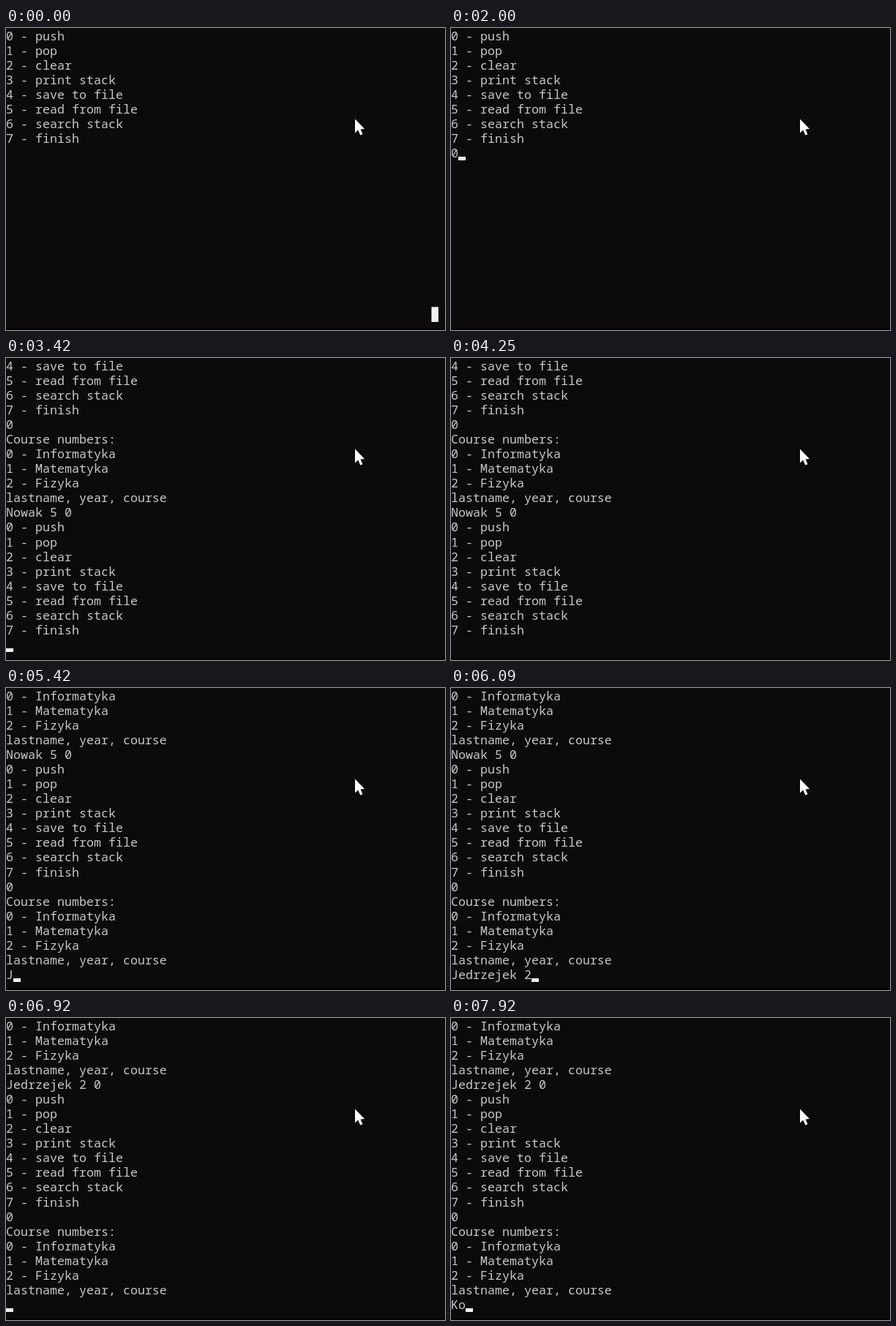
Recreate the animation shown at these times as an HTML page with a canvas. Size 600x413 px, loop 8000 ms.

```html
<!DOCTYPE html>
<html lang="en">
<head>
<meta charset="utf-8">
<title>Stack console</title>
<style>
  html, body { margin: 0; width: 100%; height: 100%; overflow: hidden; background: #0c0a0b; }
  canvas { display: block; width: 600px; height: 413px; }
</style>
</head>
<body>
<canvas id="stage"></canvas>
<script>
const W = 600, H = 413, LOOP = 8000;
const COL = 10, ROW = 20.08, ROWS = 20;

const canvas = document.getElementById('stage');
const ctx = canvas.getContext('2d');
const ratio = window.devicePixelRatio || 1;
canvas.width = W * ratio;
canvas.height = H * ratio;

const MENU = ['push', 'pop', 'clear', 'print stack', 'save to file',
  'read from file', 'search stack', 'finish'].map((s, i) => `${i} - ${s}\n`).join('');
const PROMPT = '\nCourse numbers:\n0 - Informatyka\n1 - Matematyka\n2 - Fizyka\nlastname, year, course\n';

// Console output: start time, text, and typing duration (0 = all at once)
const OUTPUT = [
  [0, MENU, 0],
  [670, '0', 0],
  [2170, PROMPT, 0],
  [2840, 'Nowak 5 0', 410],
  [3330, '\n' + MENU, 0],
  [4670, '0', 0],
  [4840, PROMPT, 0],
  [5420, 'Jedrzejek 2 0', 750],
  [6250, '\n' + MENU, 0],
  [6670, '0', 0],
  [6840, PROMPT, 0],
  [7840, 'Ko', 80]
];

// Intervals in which the caret is blinked off
const CARET_OFF = [[0, 500], [1090, 1590], [4250, 4670], [7420, 7840]];
const BLOCK_END = 670;

function consoleText(t) {
  let text = '';
  for (const [start, s, span] of OUTPUT) {
    if (t < start) break;
    const count = span ? 1 + Math.floor((t - start) / span * (s.length - 1) + 0.01) : s.length;
    text += s.slice(0, count);
  }
  return text;
}

function drawPointer() {
  ctx.beginPath();
  [[477, 124.5], [477, 143.5], [481.2, 139.6], [484.3, 146.6],
   [487.5, 145.2], [484.5, 138.4], [490, 138]].forEach(([x, y]) => ctx.lineTo(x, y));
  ctx.closePath();
  ctx.fill();
}

function draw(t) {
  ctx.setTransform(ratio, 0, 0, ratio, 0, 0);
  ctx.fillStyle = '#0c0a0b';
  ctx.fillRect(0, 0, W, H);
  ctx.fillStyle = '#000';
  ctx.fillRect(0, H - 2, W, 2);

  const lines = consoleText(t).split('\n').slice(-ROWS);
  ctx.font = '16.667px "Noto Sans Mono", "DejaVu Sans Mono", monospace';
  ctx.textBaseline = 'alphabetic';
  ctx.fillStyle = '#c8c8c8';
  lines.forEach((s, i) => ctx.fillText(s, 0, 16.6 + i * ROW));

  ctx.fillStyle = '#f2f2f2';
  if (!CARET_OFF.some(([a, b]) => t >= a && t < b)) {
    const row = lines.length - 1;
    ctx.fillRect(lines[row].length * COL, Math.round(15.5 + row * ROW), COL, 5);
  }
  if (t < BLOCK_END) ctx.fillRect(581.5, 381.5, 9.5, 20.5);

  ctx.fillStyle = '#fff';
  drawPointer();
}

const origin = performance.now();
function tick() {
  draw((performance.now() - origin) % LOOP);
  requestAnimationFrame(tick);
}
tick();
</script>
</body>
</html>
```
